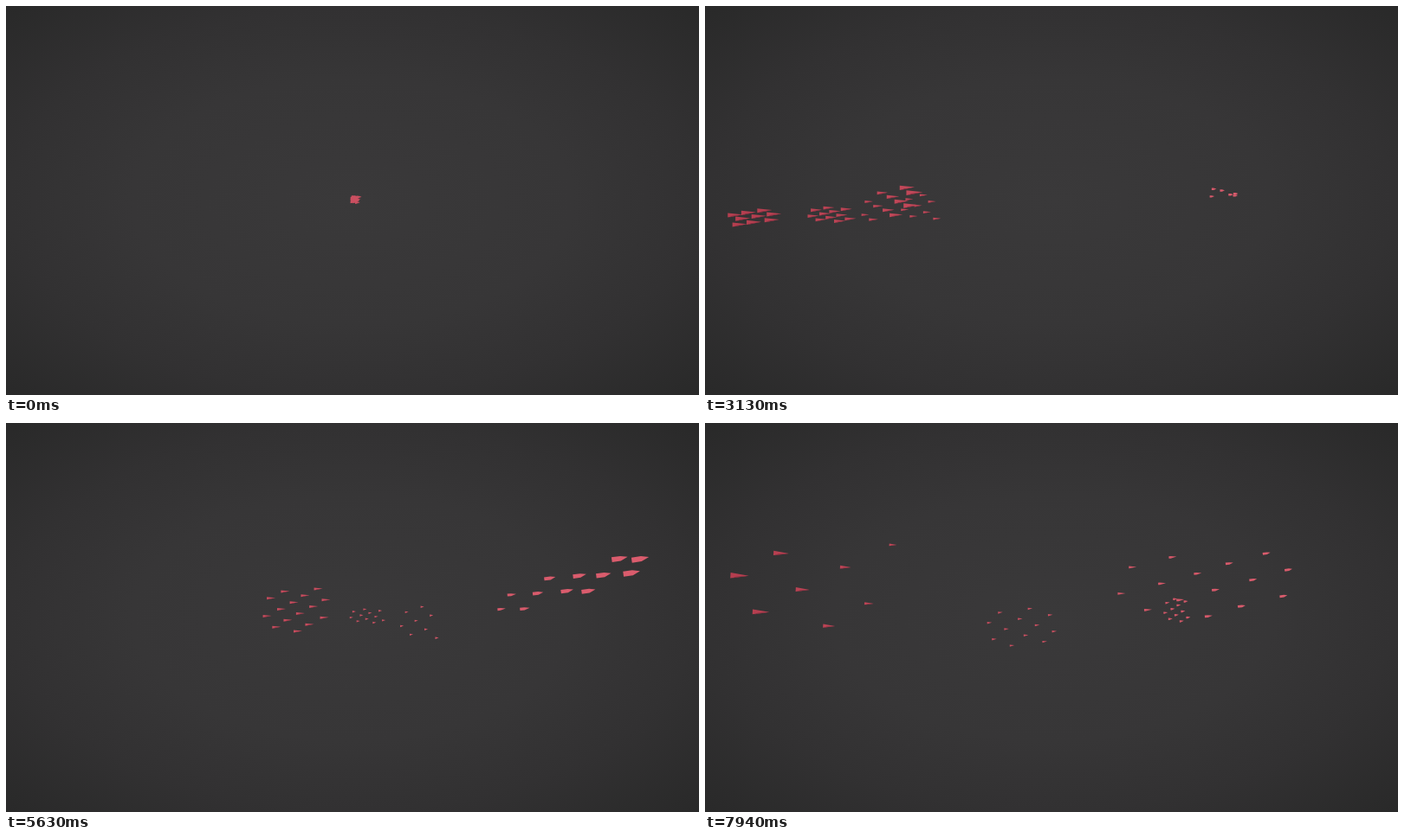
These frames come from a looping animation (800x450 px, 8000 ms). An HTML page with a canvas:

```html
<!DOCTYPE html>
<html lang="en">
<head>
<meta charset="utf-8">
<title>Flock</title>
<style>
html, body { margin: 0; width: 100%; height: 100%; overflow: hidden; background: #333; }
canvas { display: block; width: 100%; height: 100%; }
</style>
</head>
<body>
<canvas id="stage" width="800" height="450"></canvas>
<script>
const ctx = document.getElementById('stage').getContext('2d');
const LOOP = 8000, STEP = 62.5, GOLDEN = .618034;
const clamp = (v, lo, hi) => Math.min(hi, Math.max(lo, v));
const mix = (a, b, k) => a + (b - a) * k;
const fract = v => v - Math.floor(v);
const noise = n => fract(Math.sin(n * 127.1 + 31.7) * 43758.5453);

// Blends the two key poses around t and extends past both ends.
function poseAt(keys, t) {
  let i = 1;
  while (i < keys.length - 1 && t > keys[i].t) i++;
  const a = keys[i - 1], b = keys[i], k = (t - a.t) / (b.t - a.t);
  const blend = name => mix(a[name], b[name], k);
  return { x: blend('x'), y: blend('y'), w: blend('w'), h: blend('h'), size: blend('size') };
}

const key = (t, x, y, w, h, size) => ({ t, x, y, w, h, size });

// A flock is a moving patch: centre, half width, half height and cone length.
// Past its limit a member re-enters on the left, mirrored in height and depth.
const flocks = [
  { count: 15, keys: [key(3130, 40, 245, 45, 9, 17), key(5630, 337, 217, 37, 27, 10), key(7940, 580, 188, 105, 40, 9)] },
  { count: 11, keys: [key(3130, 147, 241, 23, 9, 13), key(5630, 418, 223, 20, 9, 4), key(7940, 545, 216, 14, 15, 5)] },
  { count: 8, limit: 600, after: 6440,
    keys: [key(3130, 250, 232, 22, 16, 9), key(5630, 478, 230, 24, 21, 4), key(7940, 655, 235, 40, 22, 5)],
    reentry: { tilt: .07, taper: .07,
      keys: [key(6440, -95, 198, 105, 50, 24), key(7940, 130, 190, 105, 55, 24)] } },
  { count: 12, limit: 738, after: 5700, rise: -.32, growth: .4,
    keys: [key(3130, 215, 228, 32, 18, 14), key(5630, 655, 185, 90, 17, 15), key(7940, 1040, 150, 150, 20, 18)],
    reentry: { tilt: -.04,
      keys: [key(6440, 243, 247, 52, 14, 5.5), key(7940, 367, 237, 42, 25, 5.5)] } }
];

function place(group, u, v, t) {
  const { x, y, w, h, size } = poseAt(group.keys, t);
  const px = x + u * w;
  return {
    x: px,
    y: y + v * h + u * w * (group.rise || 0),
    size: size * (1 + u * (group.growth || 0)) - px * (group.taper || 0),
    tilt: group.tilt ?? -.14 * clamp((px - 480) / 160, 0, 1)
  };
}

// The tight cluster spreads while it flies to the far right edge.
function opening(id, rank, t) {
  const k = t < 1380 ? (t / 1380) ** .81 : 1 + (t - 1380) * .00067;
  const row = rank ** .7;
  const x0 = 404 + (noise(id) - .5) * 8, y0 = 224.5 + (noise(id + 60) - .5) * 8;
  const y1 = mix(220, 207, row) + noise(id + 120) * mix(11, 22, row);
  return {
    x: mix(x0, 486 + 68 * row, k),
    y: mix(y0, y1, Math.min(k * 1.2, 1)) - Math.max(0, k - 1) * 8,
    size: 5.5, tilt: 0
  };
}

function locate(flock, i, id, rank, t) {
  const start = opening(id, rank, t);
  if (start.x < 612 + 34 * rank) return start;
  const u = 2 * (i + .2 + .6 * noise(id + 200)) / flock.count - 1;
  const v = 2 * fract((i + 1) * GOLDEN) - 1;
  const cone = place(flock, u, v, t);
  const leaves = flock.reentry && cone.x > flock.limit && t > flock.after;
  return leaves ? place(flock.reentry, u, -v, t) : cone;
}

function polygon(color, points) {
  ctx.fillStyle = color;
  ctx.beginPath();
  for (const [x, y] of points) ctx.lineTo(x, y);
  ctx.fill();
}

function drawCone({ x, y, size, tilt }) {
  const side = clamp(x / 640, 0, 1);
  const shoulder = size * .55 * clamp((x - 480) / 140, 0, 1);
  const half = Math.max(1.2, size * .15), left = -size / 2, tip = size / 2;
  const color = `rgb(${mix(178, 218, side)},${mix(60, 92, side)},${mix(77, 109, side)})`;
  ctx.save();
  ctx.translate(x, y);
  ctx.rotate(tilt);
  polygon(color, [[left, -half], [left + shoulder, -half], [tip, -half * .3],
    [left + shoulder, half], [left, half]]);
  if (size > 7 && x < 480) {
    polygon('#872f40', [[left + size * .1, half], [left + size * .3, half * .3], [tip, -half * .3]]);
  }
  ctx.restore();
}

function drawBackdrop() {
  ctx.save();
  ctx.scale(1, 450 / 800);
  const glow = ctx.createRadialGradient(400, 400, 0, 400, 400, 566);
  glow.addColorStop(0, '#3a393a');
  glow.addColorStop(.45, '#373637');
  glow.addColorStop(.7, '#323132');
  glow.addColorStop(1, '#292929');
  ctx.fillStyle = glow;
  ctx.fillRect(0, 0, 800, 800);
  ctx.restore();
}

const total = flocks.reduce((sum, flock) => sum + flock.count, 0);

function draw(t) {
  drawBackdrop();
  let id = 0;
  for (const flock of flocks) {
    for (let i = 0; i < flock.count; i++, id++) {
      drawCone(locate(flock, i, id, id / (total - 1), t));
    }
  }
}

const begin = performance.now();
function tick() {
  const t = (performance.now() - begin) % LOOP;
  draw(Math.floor(t / STEP) * STEP);
  requestAnimationFrame(tick);
}
tick();
</script>
</body>
</html>
```
